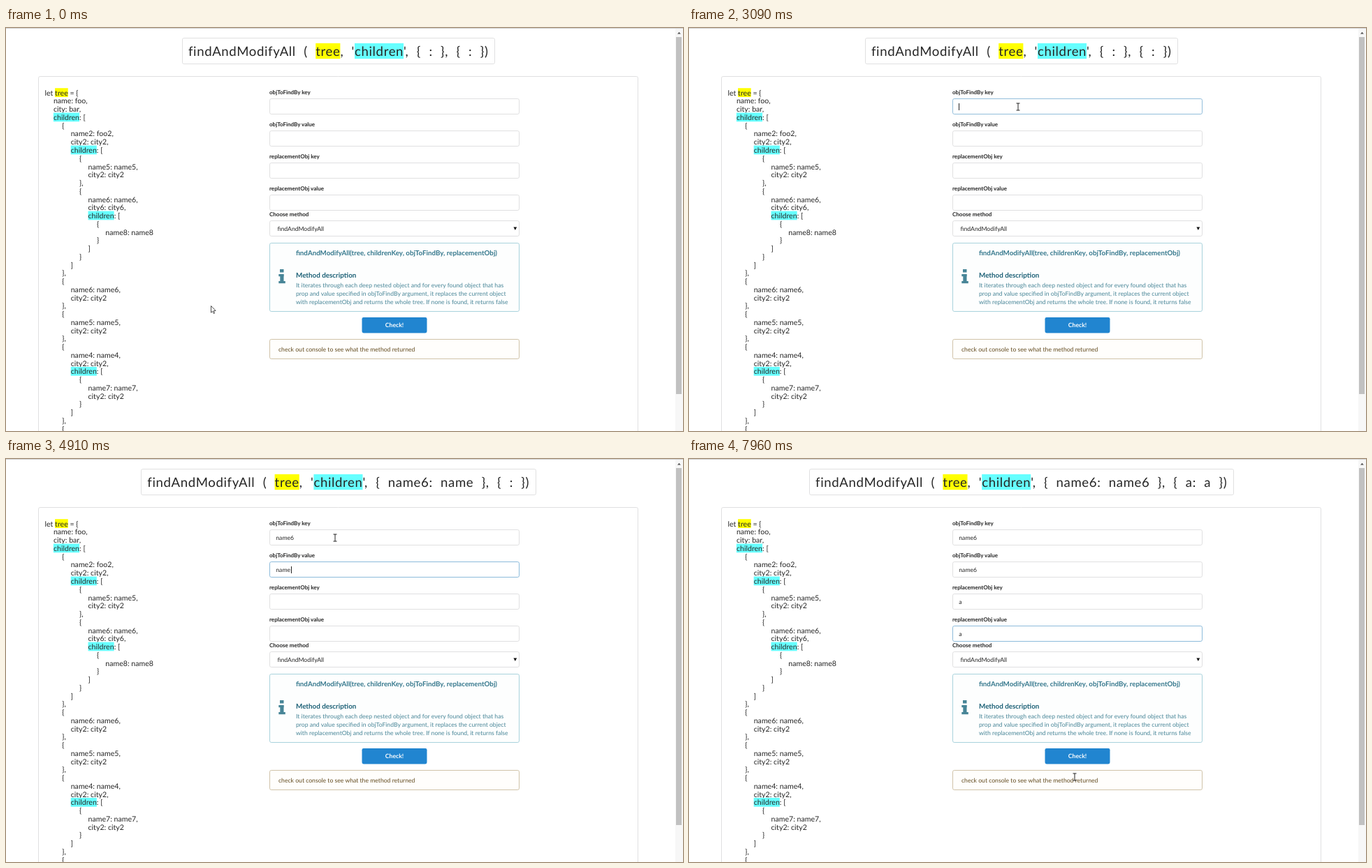
An HTML page with a canvas for the animation above (7.99 s loop, 969 by 578 pixels).

```html
<!DOCTYPE html>
<html lang="en">
<head>
<meta charset="utf-8">
<title>Tree search form</title>
<style>
html, body { margin: 0; width: 100%; height: 100%; overflow: hidden; background: #fff; }
canvas { display: block; }
</style>
</head>
<body>
<canvas id="stage" width="969" height="578"></canvas>
<script>
const ctx = document.getElementById('stage').getContext('2d');
const LOOP = 7990, BLINK = 525, FADE = 120;
const INK = '#262626', EDGE = [224, 224, 225], FOCUS = [140, 187, 219];
const YELLOW = '#ffff00', CYAN = '#66ffff';
const BODY = 8.65, CODE = 10.62, HEAD = 18.6;

const TREE = `let tree = {
 name: foo,
 city: bar,
 children: [
  {
   name2: foo2,
   city2: city2,
   children: [
    {
     name5: name5,
     city2: city2
    },
    {
     name6: name6,
     city6: city6,
     children: [
      {
       name8: name8
      }
     ]
    }
   ]
  },
  {
   name6: name6,
   city2: city2
  },
  {
   name5: name5,
   city2: city2
  },
  {
   name4: name4,
   city2: city2,
   children: [
    {
     name7: name7,
     city2: city2
    }
   ]
  },
  {`.split('\n');

const FIELDS = [
  ['objToFindBy key', 101], ['objToFindBy value', 147],
  ['replacementObj key', 193], ['replacementObj value', 239]
];
// [time, field] moves the focus; [time, field, character] types
const EVENTS = [
  [2980, 0], [3690, 0, 'n'], [3740, 0, 'a'], [3900, 0, 'm'], [3950, 0, 'e'], [4260, 0, '6'],
  [4400, 1], [4640, 1, 'n'], [4720, 1, 'a'], [4810, 1, 'm'], [4910, 1, 'e'], [5290, 1, '6'],
  [5680, 2], [6570, 2, 'a'],
  [6780, 3], [7000, 3, 'a']
];
// [start, end, bend x, bend y, target x, target y]
const MOVES = [
  [30, 720, 190, 398, 99, 378],
  [910, 1550, 240, 335, 121, 251],
  [1700, 1760, 122, 251, 124, 250],
  [1890, 2690, 300, 225, 505, 90],
  [2740, 3070, 488, 100, 471, 113],
  [7530, 7960, 660, 440, 552, 456]
];

let hits = [];
const clamp = v => Math.max(0, Math.min(1, v));
const mix = (a, b, k) => a + (b - a) * k;

function setFont(size, weight = 400, letter = 0, word = 0) {
  ctx.font = `${weight} ${size}px Lato, sans-serif`;
  ctx.letterSpacing = letter + 'px';
  ctx.wordSpacing = word + 'px';
}

// Writes in the current font and returns the x where the text ends.
function write(str, x, y, color = INK, size = BODY, back) {
  const w = ctx.measureText(str).width;
  if (back) {
    ctx.fillStyle = back;
    ctx.fillRect(x, y - size * 0.987, w, size * 1.2);
  }
  ctx.fillStyle = color;
  ctx.fillText(str, x, y);
  hits.push([x, y - size, x + w, y + size * 0.25]);
  return x + w;
}

function label(str, x, y, size, weight, color) {
  setFont(size, weight);
  return write(str, x, y, color, size);
}

function box(x, y, w, h, stroke, fill) {
  ctx.beginPath();
  ctx.roundRect(x + 0.5, y + 0.5, w, h, 2.3);
  if (fill) { ctx.fillStyle = fill; ctx.fill(); }
  ctx.strokeStyle = stroke;
  ctx.lineWidth = 1;
  ctx.stroke();
}

function rect(color, x, y, w, h) {
  ctx.fillStyle = color;
  ctx.fillRect(x, y, w, h);
}

function shape(color, ...points) {
  ctx.beginPath();
  points.forEach(([x, y]) => ctx.lineTo(x, y));
  ctx.closePath();
  ctx.fillStyle = color;
  ctx.fill();
}

const gray = `rgb(${EDGE})`;

function formState(t) {
  const state = { texts: ['', '', '', ''], glow: [0, 0, 0, 0], focus: -1, last: 0 };
  for (const [time, field, char] of EVENTS) {
    if (time > t) break;
    state.last = time;
    if (char) { state.texts[field] += char; continue; }
    const k = clamp((t - time) / FADE);
    state.glow = state.glow.map((_, i) => i === field ? k : i === state.focus ? 1 - k : 0);
    state.focus = field;
  }
  state.caret = Math.floor((t - state.last) / BLINK) % 2 === 0;
  return state;
}

function drawHeader([k1, v1, k2, v2]) {
  const braces = (k, v) => ['{', k + ':', v, '}'].filter(Boolean).join(' ');
  const parts = [
    ['findAndModifyAll ( '], ['tree', YELLOW], [", '"], ['children', CYAN],
    [`', ${braces(k1, v1)}, ${braces(k2, v2)})`]
  ];
  setFont(HEAD, 400, 0.62, 6);
  const width = parts.reduce((sum, [s]) => sum + ctx.measureText(s).width, 0);
  let x = 475.75 - width / 2;
  const left = Math.round(x - 9);
  box(left, 14, Math.round(951.5 - 2 * left) - 1, 37, gray);
  for (const [s, back] of parts) x = write(s, x, 40.2, INK, HEAD, back);
}

function drawTree() {
  setFont(CODE);
  TREE.forEach((line, row) => {
    const text = line.trimStart();
    let x = 55.5 + (line.length - text.length) * 12.4;
    const y = 96.7 + row * 11.757;
    for (const part of text.split(/(tree|children)/)) {
      const back = part === 'tree' ? YELLOW : part === 'children' ? CYAN : null;
      if (part) x = write(part, x, y, INK, CODE, back);
    }
  });
}

function drawFields(state) {
  FIELDS.forEach(([name, top], i) => {
    label(name, 377, top - 6, 8.03, 700, INK);
    const edge = EDGE.map((c, n) => Math.round(mix(c, FOCUS[n], state.glow[i])));
    box(377, top, 357, 22, `rgb(${edge})`, '#fff');
    const text = state.texts[i];
    const end = label(text, 386.3, top + 14.7, BODY, 400, INK);
    if (state.focus === i && state.caret) {
      rect('#222', Math.floor(end) + (text ? 1 : 0), top + 7, 1, 10);
    }
    hits.push([377, top, 735, top + 23]);
  });
}

function drawPanels() {
  label('Choose method', 377, 270.2, 8.03, 700, INK);
  box(377, 276, 357, 22, gray);
  label('findAndModifyAll', 388.5, 290.9, BODY, 400, INK);
  shape('#111', [726.4, 285.6], [731.2, 285.6], [728.8, 290]);

  box(377, 308, 357, 98, '#a9d3dc', '#fdfefe');
  const teal = '#478597';
  label('findAndModifyAll(tree, childrenKey, objToFindBy, replacementObj)', 415, 325.6, 9.75, 700, '#34778c');
  label('Method description', 415, 358.2, 9.85, 700, '#1c6076');
  [
    'It iterates through each deep nested object and for every found object that has',
    'prop and value specified in objToFindBy argument, it replaces the current object',
    'with replacementObj and returns the whole tree. If none is found, it returns false'
  ].forEach((s, i) => label(s, 415, 371.7 + i * 11.9, BODY, 400, teal));
  rect(teal, 392, 346, 5.5, 4.5);
  rect(teal, 390.3, 353, 7.2, 3.2);
  rect(teal, 392.3, 353, 5.2, 12);
  rect(teal, 390.3, 363, 9.5, 3.2);

  ctx.beginPath();
  ctx.roundRect(509.5, 415, 93, 22.4, 2.3);
  ctx.fillStyle = '#2185d0';
  ctx.fill();
  ctx.textAlign = 'center';
  label('Check!', 556, 429.3, BODY, 700, '#fff');
  ctx.textAlign = 'left';

  box(377, 446, 357, 28, '#d0c3a8', '#fffefc');
  label('check out console to see what the method returned', 390, 464, BODY, 400, '#624a1e');
}

function drawWindow() {
  rect('#fff', 0, 0, 969, 578);
  rect('#d2d2d2', 0, 0, 969, 1);
  rect('#f7f7f7', 958, 1, 11, 577);
  rect('#c1c1c1', 959, 13, 8, 512);
  shape('#505050', [961, 8.5], [963.4, 5.8], [965.8, 8.5]);
  box(46, 69, 858, 530, gray);
}

function pointerAt(t) {
  let x = 293.5, y = 398.6;
  for (const [start, end, bx, by, tx, ty] of MOVES) {
    if (t < start) break;
    const u = clamp((t - start) / (end - start)), k = u * u * (3 - 2 * u);
    const bend = (a, b, c) => mix(mix(a, b, k), mix(b, c, k), k);
    x = bend(x, bx, tx);
    y = bend(y, by, ty);
    if (u < 1) break;
  }
  return [x, y];
}

function drawPointer(t) {
  const [x, y] = pointerAt(t);
  const overText = hits.some(([l, top, r, b]) => x >= l && x <= r && y >= top && y <= b);
  ctx.strokeStyle = '#222';
  ctx.lineWidth = 1;
  ctx.beginPath();
  if (overText) {
    ctx.moveTo(x - 2.5, y - 5);
    ctx.lineTo(x + 2.5, y - 5);
    ctx.moveTo(x, y - 5);
    ctx.lineTo(x, y + 5);
    ctx.moveTo(x - 2.5, y + 5);
    ctx.lineTo(x + 2.5, y + 5);
  } else {
    const outline = [[0, 0], [0, 9.6], [2.2, 7.6], [3.8, 11], [5.2, 10.3], [3.7, 7.1], [6.6, 6.8]];
    outline.forEach(([dx, dy]) => ctx.lineTo(x + dx, y + dy));
    ctx.closePath();
    ctx.fillStyle = '#fff';
    ctx.fill();
    ctx.lineWidth = 0.8;
  }
  ctx.stroke();
  if (t >= 1900 && t < 1990) {
    ctx.beginPath();
    ctx.arc(126.5, 249, 6.4, 0, Math.PI * 2);
    ctx.strokeStyle = '#666';
    ctx.lineWidth = 0.8;
    ctx.stroke();
  }
}

function draw(t) {
  hits = [];
  const state = formState(t);
  drawWindow();
  drawHeader(state.texts);
  drawTree();
  drawFields(state);
  drawPanels();
  drawPointer(t);
}

ctx.textRendering = 'geometricPrecision';
const began = performance.now();
function tick() {
  draw((performance.now() - began) % LOOP);
  requestAnimationFrame(tick);
}
tick();
</script>
</body>
</html>
```
